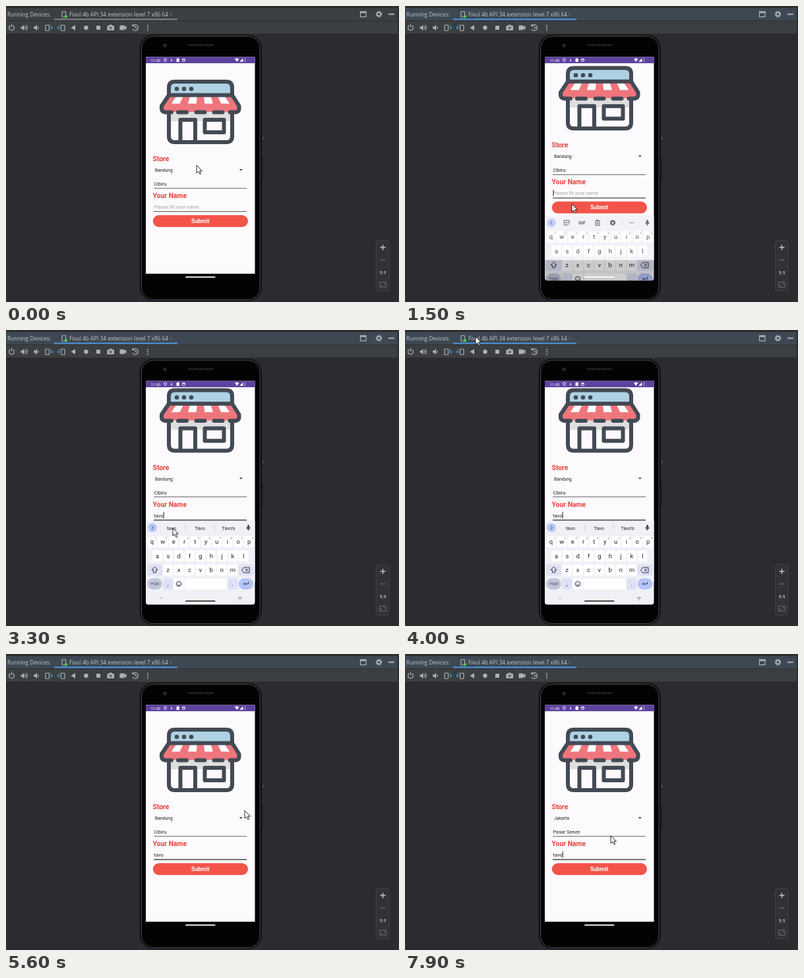
Write an HTML page that moves like this. It is 596x450 px and loops after 8000 ms.

```html
<!DOCTYPE html>
<html lang="en">
<head>
<meta charset="utf-8">
<title>Store form on a running device</title>
<style>
  html, body { margin: 0; width: 100%; height: 100%; overflow: hidden; background: #2b2c2f; }
  svg { display: block; width: 596px; height: 450px; }
  text { font-family: Roboto, sans-serif; white-space: pre; }
  .ide { font: 8.3px "Open Sans", sans-serif; fill: #c3c6c8; }
  .title { font-weight: 700; font-size: 10.4px; fill: #e8443c; }
  .field { font-size: 7.4px; fill: #222; }
  .item { font-size: 6.8px; fill: #222; }
  .mid { text-anchor: middle; }
  .line { fill: none; stroke: #afb1b3; stroke-width: 1.2; }
  .ink { fill: none; stroke: #434a54; stroke-width: 6; stroke-linejoin: round; stroke-linecap: round; }
  .kb { fill: none; stroke: #34363f; stroke-width: 1; stroke-linejoin: round; }
  #popup rect.sheet { filter: drop-shadow(0 1.5px 2.5px rgba(0,0,0,.35)); }
</style>
</head>
<body>
<svg viewBox="0 0 596 450">
  <defs>
    <clipPath id="screen"><path d="M212 77.500H377.500V413.500q0 4-4 4H216q-4 0-4-4Z"/></clipPath>
    <g id="speaker"><path d="M-4-1.5h2l3-3v9l-3-3h-2Z" fill="#afb1b3"/><path class="line" d="M2.5-2q1.5 2 0 4"/></g>
    <g id="turn"><rect class="line" x="-5" y="-4" width="5.5" height="8.5" rx=".8"/>
      <path d="M2-3.500q3 1 2.500 5l-2-1.500M4.500 1.500l1.500-2" fill="none" stroke="#3592c4" stroke-width="1.300"/></g>
    <path id="mic" d="M-1.300-3a1.300 1.300 0 0 1 2.600 0v3a1.300 1.300 0 0 1-2.600 0ZM-3-1q0 3.500 3 3.500t3-3.500h-1q0 2.500-2 2.500t-2-2.500ZM-.5 2.500h1v2h-1Z" fill="#34363f"/>
    <g id="gear"><circle r="2.800" fill="none" stroke="currentColor" stroke-width="1.900"/>
      <circle r="4.200" fill="none" stroke="currentColor" stroke-width="1.500" stroke-dasharray="1.650"/></g>
  </defs>

  <!-- tool window -->
  <rect id="header" y="3" width="594" height="19"/>
  <rect y="23" width="594" height="19" fill="#3c3f41"/>
  <path d="M0 1.500H596M0 22.500H596" stroke="#2d2f31"/>
  <text class="ide" x="2" y="16">Running Devices:</text>
  <text class="ide" x="96" y="16">Fivul 4b API 34 extension level 7 x86 64</text>
  <rect id="tabline" x="73" y="19" width="187" height="2.500"/>
  <rect class="line" x="85" y="8.500" width="5.500" height="8.500" rx=".8"/><circle cx="91" cy="16" r="2.300" fill="#4fc35a"/>
  <path d="M247.500 10.500l4.500 4.500m0-4.500l-4.500 4.500" stroke="#686d70" stroke-width=".8"/>
  <g class="line"><rect x="537.500" y="8.500" width="8.500" height="8"/><path d="M537.500 9.700h8.500M580 12.500h9" stroke-width="2"/></g>
  <use href="#gear" x="565.500" y="12.500" color="#afb1b3"/>
  <rect id="hover" x="94" y="25" width="17" height="16" rx="2" fill="#4c5052"/>
  <path class="line" d="M6.500 29.500a4 4 0 1 0 4 0M8.500 27.500v5"/>
  <use href="#speaker" x="26.500" y="33"/><path class="line" d="M30.500 29q3.500 4 0 8"/>
  <use href="#speaker" x="46" y="33"/>
  <use href="#turn" transform="translate(65 33)"/><use href="#turn" transform="translate(84 33) scale(-1 1)"/>
  <g fill="#afb1b3"><path d="M98.500 33l6.500-4v8Z"/><circle cx="121.500" cy="33" r="3.200"/><rect x="137" y="30" width="6" height="6"/>
    <path d="M153.500 30h2.500l1-1.500h3.500l1 1.500h2.500v7h-10.500ZM172.500 29.500h7v2.200l3-2v6.500l-3-2v2.300h-7Z"/>
    <circle cx="215" cy="29.500" r="1.100"/><circle cx="215" cy="33" r="1.100"/><circle cx="215" cy="36.500" r="1.100"/></g>
  <circle cx="158.800" cy="33.300" r="2" fill="#3c3f41"/><circle cx="158.800" cy="33.300" r="1" fill="#afb1b3"/>
  <path class="line" d="M192.500 30a4.500 4.500 0 1 1-.5 5M192 27.500v3h3M196.500 30.500v3h2.500"/>

  <!-- zoom controls -->
  <rect x="561.500" y="356.500" width="19.500" height="77" rx="3" fill="#303234" stroke="#3d4042"/>
  <path d="M567.500 367h8M571.500 363v8" stroke="#c0c2c4" stroke-width="1.500"/><path d="M567.500 386h8" stroke="#65686a" stroke-width="1.300"/>
  <text class="ide mid" x="571.500" y="407.500" style="font-weight:700;font-size:7.500px">1:1</text>
  <path d="M566.500 419.500h10v8h-10ZM568.500 425.500v-2.500M568.500 425.500h2.500M574.500 421.500v2.500M574.500 421.500h-2.500" fill="none" stroke="#65686a"/>

  <!-- phone -->
  <path d="M388.500 197v10M388.500 230v37" stroke="#1a1b1c" stroke-width="2"/><path d="M389.500 198v5" stroke="#66686a"/>
  <rect x="203" y="44" width="184.500" height="404" rx="20" fill="#0c0d0e" stroke="#161718"/>
  <rect x="205.500" y="46" width="179.500" height="400.500" rx="18" fill="#030303" stroke="#55575a" stroke-width=".9"/>
  <circle cx="241" cy="60" r="2.800" fill="#25272a"/>
  <path d="M276.500 59.500h38.500" stroke="#2c2e31" stroke-width="2.500" stroke-dasharray="2.500 1"/>

  <g clip-path="url(#screen)">
    <g id="app">
      <rect x="212" y="77" width="166" height="330" fill="#fcfafd"/>
      <rect x="247" y="115" width="96" height="24" rx="9" fill="#aed2e3"/>
      <rect x="247" y="158" width="96" height="17" fill="#dedede"/>
      <g id="stripes"></g>
      <path d="M237 148.500h115v12.500H237Z" fill="#ef767c"/>
      <g class="ink">
        <path d="M247 135.500V124q0-9 9-9h78q9 0 9 9v11.500ZM246 137l-10 15v4q0 4.500 5 5.500h10M344 137l9.500 15v4q0 4.500-5 5.500h-9"/>
        <path d="M261 161.500h13M288.500 161.500h13M315.500 161.500h13"/>
        <path d="M247 163v35q0 9 9 9h78q9 0 9-9v-35M264.500 206v-33h22.500v33M301.500 173h29v19h-29Z"/>
      </g>
      <g fill="#434a54"><circle cx="259" cy="126" r="3.300"/><circle cx="270" cy="126" r="3.300"/><circle cx="281" cy="126" r="3.300"/></g>

      <text class="title" x="222.500" y="236">Store</text>
      <circle id="ripple" cx="356" cy="249" r="8.500" fill="#dedddf"/>
      <text class="item" id="city" x="226" y="252"></text>
      <path d="M353.800 248h5l-2.500 2.500Z" fill="#333"/>
      <text class="field" id="branch" x="224.500" y="273"></text>
      <path d="M224 277.200h141" stroke="#555" stroke-width=".9"/>
      <text class="title" x="222.500" y="292">Your Name</text>
      <text class="field" id="hint" x="224.500" y="308" style="fill:#a3a2a6">Please fill your name</text>
      <text class="field" id="name" x="224.500" y="308"></text>
      <rect id="caret" y="300" width="1" height="10" fill="#222"/>
      <path id="underline" d="M224 312.500h141" stroke="#444"/>
      <rect x="222.800" y="318" width="144.200" height="18" rx="9" fill="#f3544a"/>
      <text class="mid" x="294.700" y="330" font-size="8.500" font-weight="600" fill="#fff">Submit</text>
      <g id="popup">
        <rect class="sheet" x="222.500" y="238.500" width="124.500" height="40" rx="1" fill="#fdfcfd"/>
        <rect id="pressed" x="222.500" y="258.500" width="124.500" height="20" fill="#e2e1e3"/>
        <text class="item" x="226" y="251">Bandung</text><text class="item" x="226" y="271">Jakarta</text>
      </g>
    </g>

    <rect x="212" y="77" width="166" height="10" fill="#5d43a0"/>
    <text x="219.500" y="84.800" font-size="6" fill="#fff">11:00</text>
    <g fill="none" stroke="#fff" stroke-width=".9"><path d="M239.500 80.500l2-.8 2 .8q0 3-2 4.500-2-1.500-2-4.500ZM251 80v4M249.800 83.500h2.500"/><circle cx="269.500" cy="82.300" r="2.200"/><path d="M267.500 81.500h4"/></g>
    <path d="M258.500 80.500l1.200-1h3v5.500h-4.200ZM347 80.500q3.200-2 6.400 0l-3.200 4.300ZM359.500 79.500v5.300h-5.300Z" fill="#fff"/>
    <path d="M362.500 79.500v5.500" stroke="#fff" stroke-dasharray="1.200 1"/>

    <g id="keyboard">
      <rect x="212" y="290" width="166" height="190" fill="#f0f0f7"/>
      <g id="keys"></g>
      <g class="kb">
        <path d="M225.500 360l4.500 4.800h-2.500v4h-4v-4h-2.500ZM360.500 361h8.500v8h-8.500l-3-4ZM362.800 363l4 4m0-4l-4 4M367.500 383v3h-7M362.500 384l-2 2 2 2"/>
        <circle cx="262" cy="386" r="3.800"/><path d="M260 387.200q2 2 4 0M260.500 384.700v.8M263.500 384.700v.8"/>
        <path d="M233 406.500l2 2 2-2M352 406.500h6M352.500 408h5M354 410h2" stroke="#8e9097" stroke-width=".9"/>
      </g>
      <circle cx="222" cy="300.500" r="6.800" fill="#b7c6f8"/>
      <path id="chevron" class="kb"/>
      <use href="#mic" x="367.500" y="300.500"/>
      <g id="tools">
        <path class="kb" d="M241.500 297h7.500v4.500l-2.500 2.500h-5ZM243 299.500q2 3 4.500 0M289 297.500h6v7h-6ZM290.500 296.500h3M290.500 300h3M290.500 302h3"/>
        <text class="mid" x="268.500" y="303" font-size="6.800" font-weight="700" fill="#34363f">GIF</text>
        <use href="#gear" x="315" y="300.500" color="#34363f" transform="translate(31.500 30) scale(.9)"/>
        <path d="M329.500 296v9" stroke="#cfd0d8"/>
        <g fill="#34363f"><circle cx="341.500" cy="300.500" r=".8"/><circle cx="344" cy="300.500" r=".8"/><circle cx="346.500" cy="300.500" r=".8"/></g>
      </g>
      <g id="suggestions">
        <path d="M272.500 296v9M316.500 296v9" stroke="#cfd0d8"/>
        <text class="field mid" x="251" y="303.500"></text><text class="field mid" x="294" y="303.500"></text><text class="field mid" x="337.500" y="303.500"></text>
      </g>
    </g>
    <rect id="pill" x="272" y="411.300" width="45.500" height="1.700" rx=".8"/>
  </g>
  <path id="cursor" d="M0 0V12l2.800-2.500 2 4.200 1.900-.9-2-4.100H8.400Z" fill="#fff" stroke="#111" stroke-width=".9"/>
</svg>

<script>
const $ = id => document.getElementById(id);
const show = (id, on) => $(id).style.display = on ? '' : 'none';
const LOOP = 8000, STEP = 100, NAME = 'tavo';

// Keyframes: [time, value, value, ...], linear in between
const MOUSE = [[0, 289, 242], [300, 283, 300], [700, 283, 300], [1000, 253, 301], [3300, 253, 301],
  [3600, 205, 150], [3900, 108, 7], [4000, 107, 10], [4200, 105, 13], [4500, 103, 29], [5000, 103, 29],
  [5300, 215, 130], [5600, 362, 238], [5800, 361, 249], [6500, 361, 249], [6900, 298, 269], [7600, 298, 269], [7900, 312, 276]];
// pan of the app, drop and opacity of the keyboard
const PANEL = [[1400, 0, 58, 0], [1500, -20.7, 29, .8], [1600, -23.5, 8, 1], [1700, -23.5, 0, 1], [4700, -23.5, 0, 1],
  [4800, -13, 30, .6], [4900, -2.5, 52, .22], [5000, 0, 58, .05], [5100, 0, 58, 0]];
const TYPED = [2500, 2700, 2900, 3000];

function at(frames, t) {
  const i = frames.findIndex(f => f[0] > t);
  if (i < 1) return frames.at(i).slice(1);
  const a = frames[i - 1], b = frames[i], k = (t - a[0]) / (b[0] - a[0]);
  return a.slice(1).map((v, j) => v + (b[j + 1] - v) * k);
}

function buildStripes() {
  const top = n => 248 + n * 94 / 9, low = n => 238 + n * 114 / 9;
  let html = '';
  for (let i = 0; i < 9; i++)
    html += `<path d="M${top(i)} 137H${top(i + 1)}L${low(i + 1)} 149H${low(i)}Z" fill="${i % 2 ? '#fff' : '#ef767c'}"/>`;
  $('stripes').innerHTML = html;
}

function buildKeys() {
  const key = (x, y, w, label = '', fill = '#fff', size = 9.5, r = 3) =>
    `<rect x="${x - w / 2}" y="${y - 8.5}" width="${w}" height="17" rx="${r}" fill="${fill}"/>` +
    `<text class="mid" x="${x}" y="${y + size * .34}" font-size="${size}" fill="#26272d">${label}</text>`;
  let html = '';
  [['qwertyuiop', 221.5, 322], ['asdfghjkl', 229.5, 343.5], ['zxcvbnm', 245.7, 365]].forEach(([row, x0, y], r) =>
    [...row].forEach((c, i) => {
      const x = x0 + i * 16.35;
      html += key(x, y, 14.6, c);
      if (!r) html += `<text class="mid" x="${x + 5.3}" y="317.500" font-size="3.800" fill="#555">${(i + 1) % 10}</text>`;
    }));
  const tint = '#dfe1f5';
  html += key(225.5, 365, 22.5, '', tint) + key(364, 365, 22.5, '', tint)
    + key(225.5, 386, 22.5, '?123', '#c1c5da', 6, 8.5) + key(245.7, 386, 14.6, ',', tint) + key(262, 386, 14.6)
    + key(303, 386, 64, '') + key(343.8, 386, 14.6, '.', tint) + key(364, 386, 22.5, '', '#b4c4f8', 9, 8.5);
  $('keys').innerHTML = html;
}

function draw(t) {
  const focused = t >= 1200, selected = t >= 7100;
  $('header').setAttribute('fill', focused ? '#3d4853' : '#3c3f41');
  $('tabline').setAttribute('fill', focused ? '#4a88c7' : '#73787c');
  show('hover', t >= 4400 && t < 5100);

  const [pan, drop, alpha] = at(PANEL, t);
  $('app').setAttribute('transform', `translate(0 ${pan})`);
  $('keyboard').setAttribute('transform', `translate(0 ${drop})`);
  $('keyboard').setAttribute('opacity', alpha);
  $('pill').setAttribute('fill', alpha === 1 ? '#333' : t > 4700 && t < 5000 ? '#0a0a0a' : '#fff');

  const typed = NAME.slice(0, TYPED.filter(x => x <= t).length);
  const proper = typed.charAt(0).toUpperCase() + typed.slice(1);
  $('name').textContent = typed;
  show('hint', !typed);
  show('tools', !typed);
  show('suggestions', typed);
  [typed, proper, proper + "'s"].forEach((s, i) => $('suggestions').querySelectorAll('text')[i].textContent = s);
  $('chevron').setAttribute('d', typed ? 'M221 298l2.500 2.500-2.500 2.500' : 'M223 298l-2.500 2.500 2.500 2.500');

  const blinkStart = t < 2500 ? 1500 : t < 4700 ? 3000 : t < 7700 ? 4700 : 7700;
  const typing = t >= 2500 && t < 3000;
  show('caret', t >= 1500 && (t < 6400 || t >= 7700) && (typing || (t - blinkStart) % 1000 < 500));
  $('caret').setAttribute('x', 224.5 + (typed ? $('name').getComputedTextLength() : 0));
  $('underline').setAttribute('stroke-width', focused ? 1.3 : .9);

  show('popup', t >= 6400 && t < 7200);
  $('popup').setAttribute('opacity', t === 6400 ? .6 : t === 7100 ? .5 : 1);
  show('pressed', t >= 7000 && t < 7200);
  show('ripple', t >= 6400 && t < 6800);
  $('city').textContent = selected ? 'Jakarta' : 'Bandung';
  $('branch').textContent = selected ? 'Pasar Senen' : 'Cibiru';

  $('cursor').setAttribute('transform', `translate(${at(MOUSE, t)})`);
}

function tick() {
  draw(Math.floor(performance.now() % LOOP / STEP) * STEP);
  requestAnimationFrame(tick);
}
buildStripes();
buildKeys();
tick();
</script>
</body>
</html>
```
